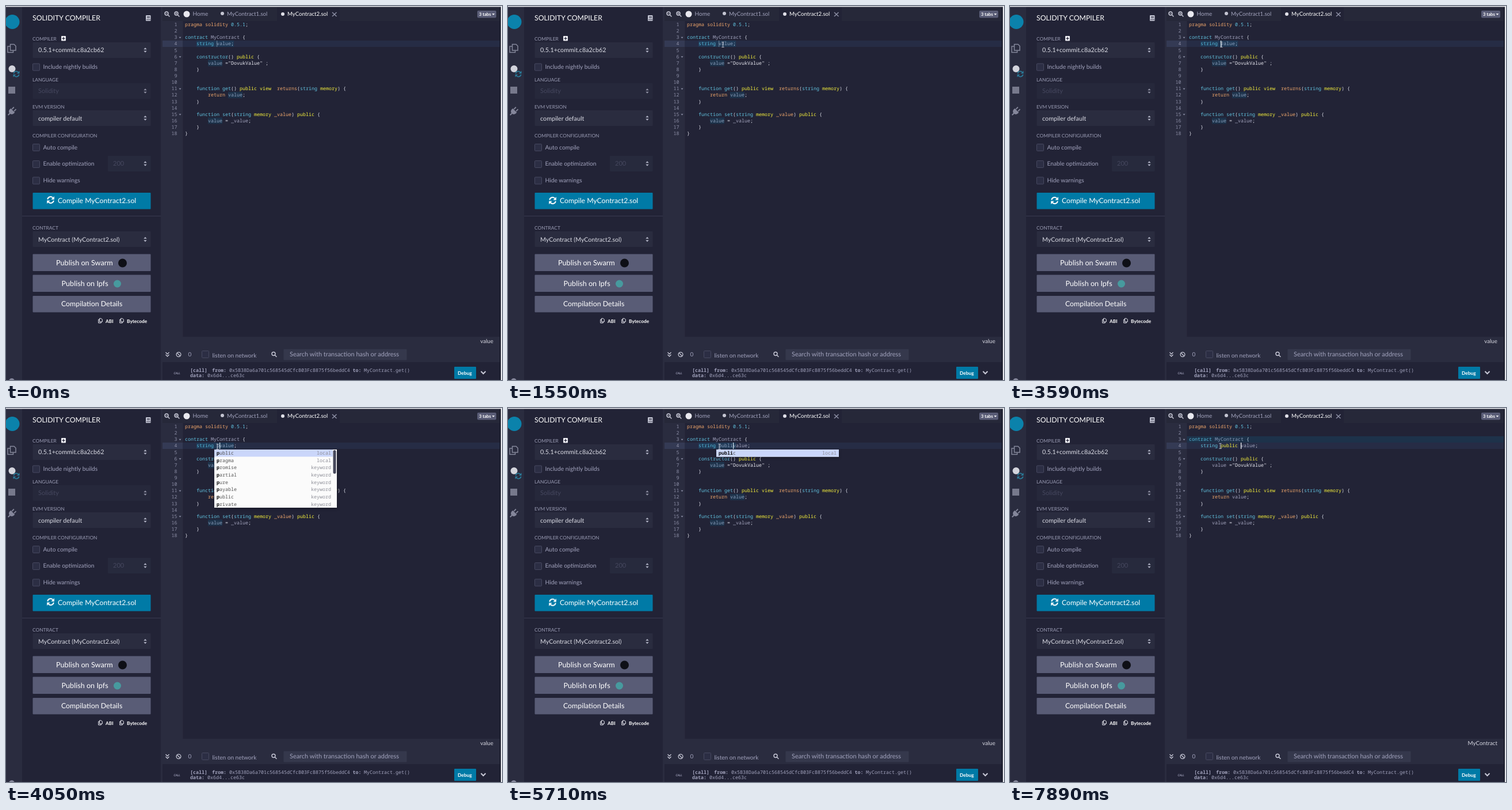
An HTML page that plays this animation: 862 px wide and 649 px high, repeating every 8 s.

```html
<!DOCTYPE html>
<html lang="en">
<head>
<meta charset="utf-8">
<title>Solidity compiler</title>
<style>
html, body { margin: 0; width: 100%; height: 100%; overflow: hidden; background: #222336; }
svg { display: block; }
text { font-family: Lato, "Open Sans", sans-serif; fill: #a2a3bd; white-space: pre; text-rendering: geometricPrecision; }
.mono text, text.mono { font-family: "Noto Sans Mono", "DejaVu Sans Mono", monospace; font-size: 8.333px; font-weight: 500; }
.lab { font-size: 8.4px; fill: #9a9cb4; }
.opt { font-size: 10.25px; }
.val { font-size: 10.75px; fill: #dcdde6; }
.btn { font-size: 12.65px; fill: #fff; }
.mono text.b, .b { font-weight: 700; }
.w { fill: #fff; }
.dim { fill: #46485f; }
.line { fill: none; stroke: #c9cad8; stroke-width: 1.3; }
.k0 { fill: #e6e6ee; }
.k1 { fill: #62c3e0; }
.k2 { fill: #f6f03c; }
.k3 { fill: #f0a76c; }
.k4 { fill: #d8d9e4; }
.num text { fill: #8c8ea6; text-anchor: end; }
.menu { filter: drop-shadow(1px 2px 2px rgba(0, 0, 0, .25)); }
.menu text { fill: #555; }
.menu .hit { fill: #111; font-weight: 600; }
.menu .meta { fill: #8f9099; text-anchor: end; }
.status { font-size: 9.8px; fill: #d5d6e0; }

.bounce { animation: bounce 2s -.5s linear infinite; }
@keyframes bounce {
  50% { transform: translateY(-2.4px); }
  70% { transform: translateY(-3.6px); }
}

.step { animation: 8s step-end infinite; }
#typed { animation-name: tint; }
#tail { animation-name: push; }
#caret { animation-name: blink; }
@keyframes tint { 0% { fill: #a2a3bd; } 72.625%, to { fill: #f6f03c; } }
@keyframes push {
  0% { transform: none; }
  50.625% { transform: translateX(5px); }
  54.625% { transform: translateX(10px); }
  58.625% { transform: translateX(15px); }
  62.625% { transform: translateX(20px); }
  67.375% { transform: translateX(25px); }
  72.625% { transform: translateX(30px); }
  81.125%, to { transform: translateX(35px); }
}
@keyframes blink {
  0% { opacity: .35; }
  31.375%, 43.875%, 81.125%, 93.625%, to { opacity: 1; }
  38.875%, 80.125%, 88.625% { opacity: 0; }
}

@keyframes menu1 { 0%, 54.625%, to { opacity: 0; } 50.625% { opacity: 1; } }
@keyframes menu2 { 0%, 58.625%, to { opacity: 0; } 54.625% { opacity: 1; } }
@keyframes menu3 { 0%, 62.625%, to { opacity: 0; } 58.625% { opacity: 1; } }
@keyframes menu4 { 0%, 67.375%, to { opacity: 0; } 62.625% { opacity: 1; } }
@keyframes menu5 { 0%, 72.625%, to { opacity: 0; } 67.375% { opacity: 1; } }

.on-value { animation-name: onValue; }
.on-contract { animation-name: onContract; }
#at-def { animation-name: atDef; }
#at-name { animation-name: atName; }
@keyframes onValue { 0% { opacity: 1; } 82.125%, to { opacity: 0; } }
@keyframes onContract { 0% { opacity: 0; } 82.125%, to { opacity: 1; } }
@keyframes atDef { 0%, 89.875%, to { opacity: 0; } 82.125% { opacity: 1; } }
@keyframes atName { 0% { opacity: 0; } 89.875%, to { opacity: 1; } }

#mouse { animation: roam 8s linear infinite; }
#arrow { animation-name: arrow; }
#beam { animation-name: beam; }
@keyframes arrow { 0% { opacity: 1; } 3.6%, to { opacity: 0; } }
@keyframes beam { 0% { opacity: 0; } 3.6%, to { opacity: 1; } }
@keyframes roam {
  0%, .875% { transform: translate(827px, 652px); animation-timing-function: ease-in-out; }
  10.625%, 12.875% { transform: translate(484px, 197px); animation-timing-function: ease-out; }
  19.2%, 23.3% { transform: translate(373.5px, 67px); }
  29.125%, 38% { transform: translate(366.5px, 66px); }
  46.125%, 98.4% { transform: translate(367.5px, 67px); }
  98.6%, to { transform: translate(365.5px, 66px); }
}
</style>
</head>
<body>
<svg width="862" height="649" viewBox="0 0 862 649">
  <defs>
    <g id="arc">
      <path d="M-5 -1A5 5 0 0 1 3.6 -3.5" fill="none" stroke="currentColor" stroke-width="1.9"/>
      <path d="M6 -6V-.8H.8Z" fill="currentColor"/>
    </g>
    <g id="sync"><use href="#arc"/><use href="#arc" transform="rotate(180)"/></g>
    <path id="sort" d="M-2.7 -1.2L0 -4.2L2.7 -1.2ZM-2.7 1.2L0 4.2L2.7 1.2Z" fill="#b4b6c8"/>
    <rect id="check" width="12" height="12" x=".5" y=".5" rx="1" fill="#2c2e44" stroke="#474960"/>
    <g id="copy" fill="none" stroke="#e8e8f0">
      <path d="M-1.5 -3.8H1.5L3.3 -2V2H-1.5Z"/><path d="M-1.5 -2H-3.3V4H1.3V2"/>
    </g>
    <g id="lens" fill="none" stroke="#c9cad8" stroke-width="1.4">
      <circle cx="-1" cy="-1" r="3"/><path d="M1.2 1.2L4.4 4.4"/>
    </g>
  </defs>

  <!-- icon bar -->
  <rect width="28" height="649" fill="#2a2c3f"/>
  <circle cx="11" cy="27.5" r="12.5" fill="#0b82ab"/>
  <g fill="none" stroke="#85879b" stroke-width="1.5">
    <path d="M7.5 66.5H14L17 69.5V77H7.5Z"/><path d="M7 70H3V80.5H12.5V77.5"/>
  </g>
  <circle cx="10.5" cy="109" r="6" fill="#d3d4dc"/>
  <use href="#sync" transform="translate(18 118) scale(.92)" color="#2a7c9b"/>
  <rect x="4" y="140" width="12" height="12" fill="#77798c"/>
  <g transform="translate(10 183) rotate(45)" fill="#85879b">
    <path d="M-5 -2.5H5V0A5 5 0 0 1 -5 0Z"/><path d="M-3.5 -8H-1.7V-3H-3.5ZM1.7 -8H3.5V-3H1.7ZM-1 4H1V9H-1Z"/>
  </g>
  <circle cx="10" cy="651" r="5" fill="#85879b"/>

  <!-- compiler panel -->
  <text x="46" y="25.2" font-size="12.3" class="w">SOLIDITY COMPILER</text>
  <rect x="243" y="16" width="8.5" height="10" rx="1" fill="#c6c8d6"/>
  <path d="M245 18.5H250M245 20.5H250M244 23.8H251" stroke="#222336" stroke-width=".9"/>
  <text x="46" y="59.5" class="lab">COMPILER</text>
  <rect x="96" y="52" width="8" height="8.5" rx="1" fill="#f0f0f5"/>
  <path d="M100 53.8V58.8M97.5 56.3H102.5" stroke="#222336" stroke-width="1.3"/>
  <g fill="#2a2c3f">
    <rect x="46.5" y="63" width="205" height="27" rx="1"/>
    <rect x="46.5" y="134" width="205" height="27" rx="1" fill="#26283b"/>
    <rect x="46.5" y="181" width="205" height="27" rx="1"/>
    <rect x="177" y="260" width="74.5" height="27" rx="1" fill="#272a3d"/>
    <rect x="46.5" y="391" width="205" height="27" rx="1"/>
  </g>
  <use href="#sort" x="242" y="76.5"/><use href="#sort" x="242" y="147.5" opacity=".75"/>
  <use href="#sort" x="242" y="194.5"/><use href="#sort" x="242" y="273.5"/><use href="#sort" x="242" y="405"/>
  <text x="56" y="80" class="val">0.5.1+commit.c8a2cb62</text>
  <use href="#check" x="46" y="99.5"/><text x="64.5" y="108.7" class="opt">Include nightly builds</text>
  <text x="46" y="130.5" class="lab">LANGUAGE</text>
  <text x="56" y="151.3" font-size="11" class="dim">Solidity</text>
  <text x="46" y="177.5" class="lab">EVM VERSION</text>
  <text x="56" y="198.5" class="val">compiler default</text>
  <text x="46" y="227.6" class="lab">COMPILER CONFIGURATION</text>
  <use href="#check" x="46" y="239"/><text x="64.5" y="248.7" class="opt">Auto compile</text>
  <use href="#check" x="46" y="268"/><text x="64.5" y="277" class="opt">Enable optimization</text>
  <text x="186" y="277.3" font-size="11" class="dim">200</text>
  <use href="#check" x="46" y="296.5"/><text x="64.5" y="306" class="opt">Hide warnings</text>
  <rect x="46.5" y="324" width="205" height="28.5" rx="1" fill="#007aa6"/>
  <g class="bounce"><use href="#sync" transform="translate(77.5 337.7) scale(1.06)" color="#fff"/></g>
  <text x="90" y="342.4" font-size="12.2" class="w">Compile MyContract2.sol</text>
  <path d="M28 364.5H270" stroke="#383a4f"/>
  <text x="46" y="387.5" class="lab">CONTRACT</text>
  <text x="56" y="408.8" class="val" style="font-size:10.6px">MyContract (MyContract2.sol)</text>
  <g fill="#595c76">
    <rect x="46.5" y="430.5" width="205" height="29.5" rx="1"/>
    <rect x="46.5" y="466.5" width="205" height="29.5" rx="1"/>
    <rect x="46.5" y="503" width="205" height="28.5" rx="1"/>
  </g>
  <text x="87" y="449.5" class="btn">Publish on Swarm</text><circle cx="202.500" cy="446" r="7.5" fill="#0e0f16"/>
  <text x="96.5" y="485.5" class="btn">Publish on Ipfs</text><circle cx="193.5" cy="482" r="6.5" fill="#479a9e"/>
  <text x="96" y="521.4" class="btn" style="font-size:12.35px">Compilation Details</text>
  <use href="#copy" x="164" y="546"/><text x="173" y="549.5" font-size="8.3" class="w b">ABI</text>
  <use href="#copy" x="201" y="546"/><text x="210" y="549.5" font-size="8.3" class="w b">Bytecode</text>
  <rect x="269" width="3" height="649" fill="#2a2c3f"/>

  <!-- tabs -->
  <rect x="272" width="586" height="26" fill="#262839"/>
  <rect x="471" y="2" width="109" height="24" fill="#222336"/>
  <use href="#lens" x="280" y="14"/><path d="M277.5 13H280.5" stroke="#c9cad8"/>
  <use href="#lens" x="297" y="14"/><path d="M294.3 13H297.7M296 11.3V14.7" stroke="#c9cad8"/>
  <circle cx="314" cy="14" r="5.5" fill="#e9e9ef"/>
  <text x="324.5" y="17.4" font-size="10">Home</text>
  <circle cx="376" cy="13" r="3" fill="#c4c5d2"/><text x="384" y="16.8" font-size="9.65">MyContract1.sol</text>
  <circle cx="481" cy="14" r="3" fill="#e0e0e8"/><text x="489" y="17.2" font-size="9.65" class="w">MyContract2.sol</text>
  <path d="M567 11L574.5 18M574.5 11L567 18" stroke="#8b8da3" stroke-width="1.6"/>
  <rect x="819" y="8" width="33" height="12.5" rx="2" fill="#595c76"/>
  <text x="822" y="17" font-size="7.7" class="w b">3 tabs</text><path d="M844.5 13.3H849.5L847 15.8Z" fill="#fff"/>

  <!-- editor -->
  <rect x="272" y="26" width="35.5" height="548" fill="#2a2c3f"/>
  <rect x="272" y="60" width="35.5" height="11" fill="#343a54"/>
  <rect x="307.5" y="60" width="550.5" height="11" fill="#262c45"/>
  <g id="nums" class="mono num"></g>
  <g id="code" class="mono"></g>
  <text id="typed" class="mono step" x="366" y="68.4">public</text>
  <g id="tail" class="step">
    <rect x="366" y="60" width="36" height="11" fill="#262c45"/>
    <text class="mono" x="366" y="68.4">value<tspan class="k4">;</tspan></text>
    <rect id="caret" class="step" x="366" y="60" width="1.2" height="11" fill="#fff"/>
  </g>
  <g fill="#0a84b4" fill-opacity=".16">
    <path class="step on-value" d="M331 60h65v11h-65zM351 93.500h25v11h-25zM386 149h25v11h-25zM351 193.500h25v11h-25z"/>
    <rect class="step on-contract" x="307.5" y="49" width="550.5" height="11"/>
  </g>
  <g id="menus" class="mono"></g>

  <!-- context line -->
  <rect x="272" y="574" width="586" height="17" fill="#2a2c3f"/>
  <text x="847" y="584.8" class="status step on-value" text-anchor="end">value</text>
  <g id="at-def" class="step">
    <text x="590" y="584.8" class="status" font-style="italic">ContractDefinition</text>
    <text x="673.5" y="584.8" class="status">MyContract</text>
    <path d="M729.5 585C729.5 580.5 732 579.2 735 579.2V576.5L739.5 580.5L735 584.5V581.8C732 581.8 730.5 582.5 729.5 585Z" fill="#d5d6e0"/>
    <text x="754" y="584.8" class="status">0 reference(s)</text>
    <path d="M819.5 583.5L823.5 579.5L827.5 583.5M835 579L839 583L843 579" class="line" style="stroke-width:1.8"/>
  </g>
  <text id="at-name" x="847" y="584.8" class="status step" text-anchor="end">MyContract</text>

  <!-- terminal -->
  <rect x="272" y="591" width="586" height="27" fill="#2a2c3f"/>
  <path d="M277.5 601L280.5 604L283.5 601M277.5 605L280.5 608L283.5 605" class="line"/>
  <circle cx="300" cy="604.8" r="3.9" class="line"/><path d="M297.3 602.1L302.7 607.5" class="line"/>
  <text x="316.5" y="608.3" font-size="10">0</text>
  <use href="#check" x="340" y="598"/>
  <text x="358.5" y="610" font-size="10.05">listen on network</text>
  <use href="#lens" x="466" y="604.5"/>
  <rect x="482.5" y="595.5" width="214" height="19" rx="1" fill="#35384c"/>
  <text x="493" y="608.4" font-size="10.95">Search with transaction hash or address</text>
  <text x="291.5" y="638.5" font-size="5" font-style="italic" class="b">CALL</text>
  <g class="mono">
    <text x="320" y="634.5" class="b">[call]</text><text x="358" y="634.5" class="b">from:</text>
    <text x="388" y="634.5">0x5B38Da6a701c568545dCfcB03FcB875f56beddC4</text>
    <text x="602.5" y="634.5" class="b">to:</text><text x="622" y="634.5">MyContract.get()</text>
    <text x="320" y="643.8" class="b">data:</text><text x="350" y="643.8">0x6d4...ce63c</text>
  </g>
  <rect x="779" y="626" width="38" height="21" rx="1" fill="#007aa6"/>
  <text x="785" y="639.5" font-size="8.4" class="w b">Debug</text>
  <path d="M825.5 634L829.5 638L833.5 634" class="line" style="stroke-width:2"/>

  <!-- window border -->
  <rect x="858" width="2" height="649" fill="#1b1d2c"/>
  <rect x="860" width="2" height="649" fill="#e8e9ee"/>
  <rect width="862" height="1.5" fill="#e8e9ee"/>

  <g id="mouse">
    <path id="arrow" class="step" d="M0 0V10.5L2.5 8.2L4.2 12L5.8 11.3L4.2 7.6H7.5Z" fill="#fff" stroke="#222" stroke-width=".6"/>
    <path id="beam" class="step" d="M-2 -4.5H-.5L0 -4L.5 -4.5H2M0 -4V4M-2 4.5H-.5L0 4L.5 4.5H2" fill="none" stroke="#d4d5de" stroke-width=".9"/>
  </g>
</svg>
<script>
const fill = (id, html) => document.getElementById(id).innerHTML = html;
const text = (x, y, body, cls = "") => `<text x="${x}" y="${y.toFixed(2)}" class="${cls}">${body}</text>`;

const code = `pragma solidity 0.5.1;

contract MyContract {
    string

    constructor() public {
        value ="DovukValue" ;
    }


    function get() public view  returns(string memory) {
        return value;
    }

    function set(string memory _value) public {
        value = _value;
    }
}`.split("\n");

// Groups in order: strings, types and names, modifiers, directives, punctuation.
const tokens = /("[^"]*")|(\b(?:contract|string|constructor|function|get|set)\b|[\d.]{5})|(\b(?:public|view|memory)\b)|(\b(?:pragma|solidity|returns?|_value(?=\)))\b)|([(){}=;]+)/g;
const paint = s => s.replace(tokens, (m, ...groups) => `<tspan class="k${groups.findIndex(Boolean)}">${m}</tspan>`);
const base = i => 35 + 11.13 * i;

fill("code", code.map((s, i) => {
  const body = s.trimStart();
  return text(311 + 5 * (s.length - body.length), base(i), paint(body));
}).join(""));

fill("nums", code.map((s, i) => {
  const y = base(i) - 3.5;
  const fold = /\{$/.test(s) ? `<path d="M300.5 ${y}h4l-2 2.5z" fill="#8c8ea6"/>` : "";
  return text(297.5, base(i), i + 1) + fold;
}).join(""));

// Completion list: `typed` letters are bold, the first row is selected.
function menu(typed, words) {
  const row = 12.65, long = words.length > 7, h = long ? 101 : words.length * row;
  const rows = words.map((w, i) => {
    const y = 81 + row * i;
    return text(366, y, `<tspan class="hit">${w.slice(0, typed)}</tspan>${w.slice(typed)}`) +
      text(long ? 565 : 571, y, i && w !== "pragma" ? "keyword" : "local", "meta");
  });
  const bar = long ? '<rect x="568.5" y="73" width="5" height="41" rx="2.5" fill="#45475a"/>' : "";
  return `<g class="menu step" style="animation-name:menu${typed}">
    <rect x="362" y="72" width="213" height="${h}" fill="#fbfbfb"/>
    <rect x="362" y="72" width="${long ? 206 : 213}" height="12.5" fill="#cad6fa"/>${rows.join("")}${bar}</g>`;
}

fill("menus", menu(1, ["public", "pragma", "promise", "partial", "pure", "payable", "public", "private"]) +
  menu(2, ["public", "pure"]) + [3, 4, 5].map(n => menu(n, ["public"])).join(""));
</script>
</body>
</html>
```
